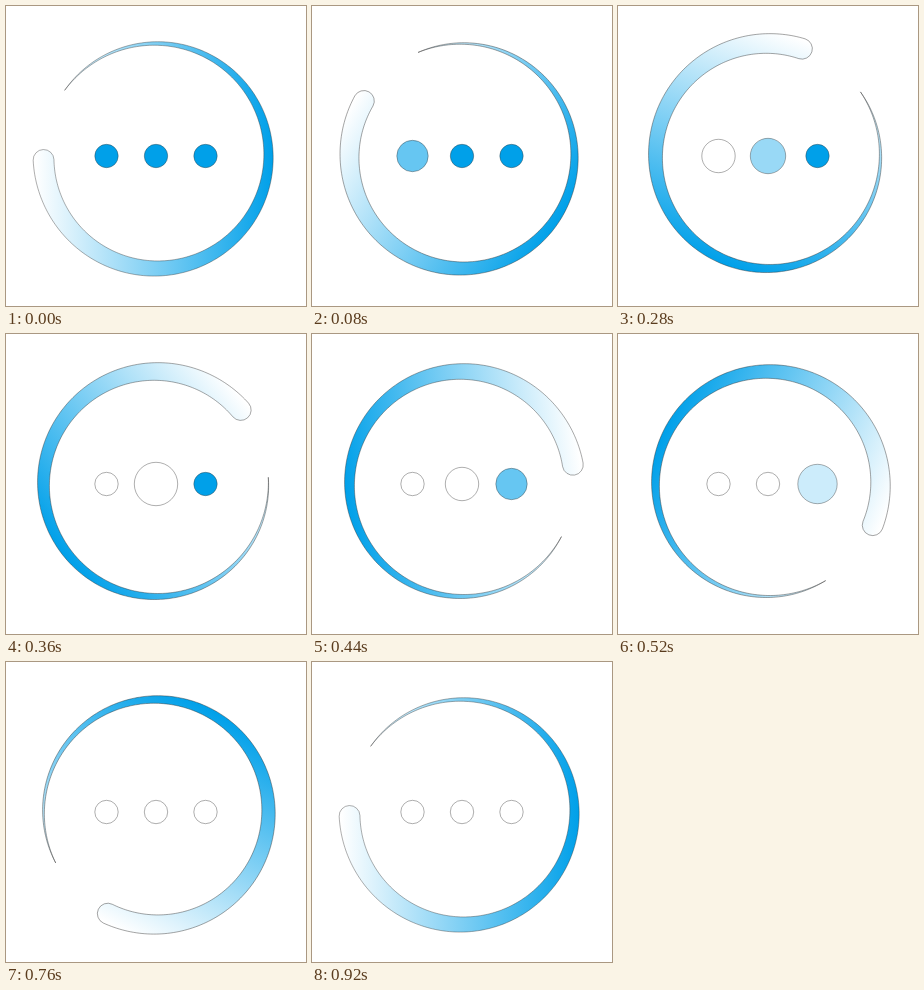
Write an HTML page with a canvas that moves like this. It is 300 by 300 pixels and loops after 960 ms.

```html
<!DOCTYPE html>
<html lang="en">
<head>
<meta charset="utf-8">
<title>Loading ring</title>
<style>
  html, body { margin: 0; width: 100%; height: 100%; overflow: hidden; background: #fff; }
  canvas { display: block; }
</style>
</head>
<body>
<canvas id="stage" width="300" height="300"></canvas>
<script>
const ctx = document.getElementById('stage').getContext('2d');
const STEP_MS = 40, STEPS = 24;
const BLUE = [0, 160, 233];
const rad = deg => deg * Math.PI / 180;

const RING = { radius: 112.5, halfWidth: 10.4, head: rad(178), span: rad(322.3) };
const DOTS = [
  { x: 100.5, start: 0 },
  { x: 150, start: 4 },
  { x: 199.5, start: 9 }
];

// Mixes white with the blue; amount 1 is full blue.
function tint(amount) {
  return `rgb(${BLUE.map(c => Math.round(255 + (c - 255) * amount)).join(',')})`;
}

function paint(path, fill) {
  ctx.fillStyle = fill;
  ctx.fill(path);
  ctx.stroke(path);
}

// A band that narrows evenly from its round head to a pointed tail.
function makeRing() {
  const { radius, halfWidth, head, span } = RING;
  const path = new Path2D();
  const segments = 240;
  const edge = (i, side) => {
    const part = i / segments;
    const r = radius + side * halfWidth * (1 - part);
    const angle = head - span * part;
    path.lineTo(r * Math.cos(angle), r * Math.sin(angle));
  };
  for (let i = 0; i <= segments; i++) edge(i, 1);
  for (let i = segments; i >= 0; i--) edge(i, -1);
  path.arc(radius * Math.cos(head), radius * Math.sin(head), halfWidth, head + Math.PI, head, true);
  path.closePath();
  return path;
}

const ringPath = makeRing();
const ringFill = ctx.createLinearGradient(-121, 0, 117, 0);
ringFill.addColorStop(0, tint(0));
ringFill.addColorStop(1, tint(1));

function drawRing(step) {
  ctx.save();
  ctx.translate(150, 150);
  ctx.rotate(2 * Math.PI * step / (STEPS - 1));
  paint(ringPath, ringFill);
  ctx.restore();
}

// Each dot swells for five steps while fading to white, then shrinks for four.
function drawDot({ x, start }, step) {
  const age = Math.max(0, step - start);
  const growth = age <= 5 ? 2 * age : Math.max(0, 10 - 2.5 * (age - 5));
  const path = new Path2D();
  path.arc(x, 150, 11.7 + growth, 0, 2 * Math.PI);
  paint(path, tint(Math.max(0, 1 - age / 5)));
}

function draw(time) {
  const step = Math.floor(time / STEP_MS) % STEPS;
  ctx.fillStyle = '#fff';
  ctx.fillRect(0, 0, 300, 300);
  ctx.lineWidth = 0.4;
  ctx.lineJoin = 'round';
  ctx.strokeStyle = '#333';
  drawRing(step);
  DOTS.forEach(dot => drawDot(dot, step));
}

const startTime = performance.now();
function tick() {
  draw(performance.now() - startTime);
  requestAnimationFrame(tick);
}
tick();
</script>
</body>
</html>
```
